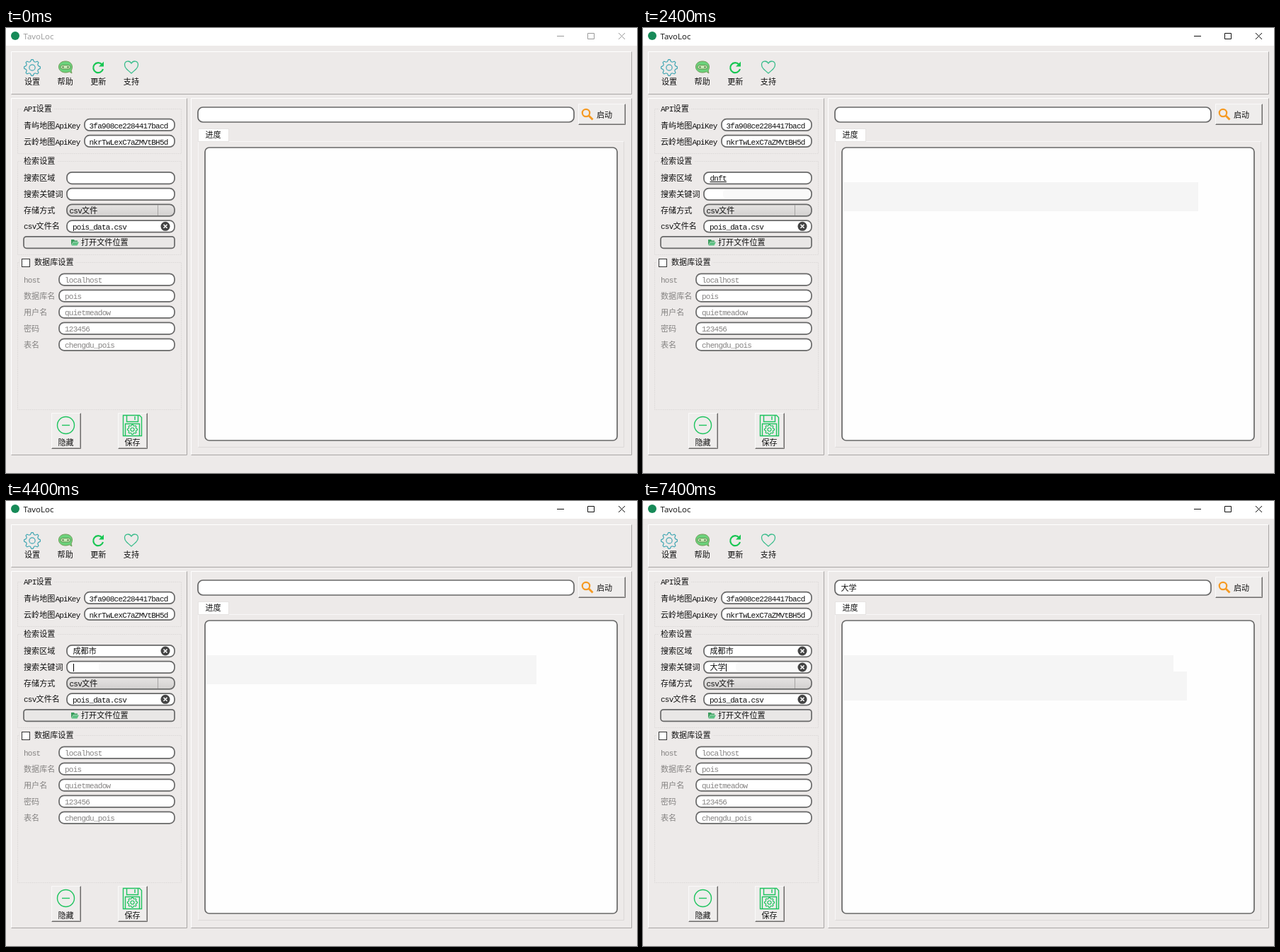
An HTML page that plays this animation: 891x629 px, repeating every 8 s.

```html
<!DOCTYPE html>
<html lang="zh">
<head>
<meta charset="utf-8">
<style>
html, body { margin: 0; width: 100%; height: 100%; overflow: hidden; background: #edeae9; }
svg { display: block; width: 891px; height: 629px; }
text { white-space: pre; }
.cjk { font: 11.1px "Noto Sans CJK SC", "Noto Sans CJK", sans-serif; }
.lat { font: 11px "Liberation Mono", monospace; letter-spacing: -.75px; }
.title { font: 11.5px "Open Sans", "Noto Sans", sans-serif; }
.cand { font: 17.2px "Open Sans", "Noto Sans CJK SC", "Noto Sans CJK", sans-serif; }
</style>
</head>
<body>
<svg id="stage" viewBox="0 0 891 629">
  <defs>
    <linearGradient id="shade" x1="0" y1="0" x2="0" y2="1">
      <stop offset="0" stop-color="#e6e4e3"/><stop offset="1" stop-color="#d2d0cf"/>
    </linearGradient>
    <clipPath id="keys"><rect x="118" y="125" width="113" height="50"/></clipPath>
  </defs>
  <g id="base"></g>
  <g id="live"></g>
</svg>
<script>
const LOOP = 8000, HAN = 11.1, LATIN = 5.85, FACE = '#edeae9';
const isHan = c => c > '\u2e80';
const textWidth = s => [...s].reduce((w, c) => w + (isHan(c) ? HAN : LATIN), 0);

// Full-width and half-width runs use separate fonts on one fixed grid.
function label(x, y, s, fill = '#111') {
  let out = '';
  for (const run of s.match(/[\u2e80-\uffff]+|[^\u2e80-\uffff]+/g) || []) {
    out += `<text class="${isHan(run[0]) ? 'cjk' : 'lat'}" x="${x}" y="${y}" fill="${fill}">${run}</text>`;
    x += textWidth(run);
  }
  return out;
}
const rect = (x, y, w, h, fill, extra = '') =>
  `<rect x="${x}" y="${y}" width="${w}" height="${h}" fill="${fill}" ${extra}/>`;
const path = (d, stroke, w = 1, fill = 'none') =>
  `<path d="${d}" stroke="${stroke}" stroke-width="${w}" fill="${fill}"/>`;
const circle = (x, y, r, fill, stroke = 'none', w = 1) =>
  `<circle cx="${x}" cy="${y}" r="${r}" fill="${fill}" stroke="${stroke}" stroke-width="${w}"/>`;
const field = (x, y, w, h, r = 7, fill = '#fff') =>
  rect(x + 1, y + 1, w - 2, h - 2, fill, `rx="${r}" stroke="#686868" stroke-width="1.7"`);

function bevel(x, y, w, h, light = '#fff', dark = '#a9a6a5') {
  const l = x + .5, t = y + .5, r = x + w - .5, b = y + h - .5;
  return path(`M${l} ${b}V${t}H${r}`, light) + path(`M${l} ${b}H${r}V${t}`, dark);
}
const button = (x, y, w, h) =>
  rect(x, y, w, h, '#efedec') + bevel(x, y, w, h, '#faf9f9', '#6f6d6c') +
  path(`M${x + 1} ${y + h - 1.5}H${x + w - 1.5}V${y + 1}`, '#aaa8a7');

function group(y, h, title, x = 25) {
  return rect(16.5, y + .5, 231, h, 'none', 'stroke="#dedbda" stroke-dasharray="2 1"') +
    rect(x - 3, y - 5, textWidth(title) + 6, 11, FACE) + label(x, y + 4, title);
}
function gear(cx, cy, r, depth, color, w) {
  let d = '';
  for (let i = 0; i < 32; i++) {
    const a = (i - 1.5) * Math.PI / 16, q = i % 4 === 1 || i % 4 === 2 ? r : r - depth;
    d += `${i ? 'L' : 'M'}${(cx + q * Math.cos(a)).toFixed(1)} ${(cy + q * Math.sin(a)).toFixed(1)}`;
  }
  return path(d + 'Z', color, w) + circle(cx, cy, r * .36, 'none', color, w);
}
const clearIcon = y => circle(225, y, 6.5, '#444') +
  path(`M222.5 ${y - 2.5}l5 5m0 -5l-5 5`, '#fff', 1.6);

function drawBase() {
  const green = '#1fc45f', gray = '#858382';
  let s = rect(0, 0, 891, 629, FACE) + rect(0, 0, 891, 25, '#fff') + circle(13, 11, 6, '#178a58');

  s += bevel(7, 33, 877, 61) + bevel(7, 99, 249, 505) + bevel(261, 99, 623, 505);

  s += gear(37, 56, 11.5, 2.6, '#43a7b3', 1.2);
  s += path('M84 47c-6 0-9.5 3.5-9.5 8s4 8 9.5 8c2 0 4-.4 5.5-1.2l3.5 2.2-1-4c1-1.3 1.5-3 1.5-5 0-4.5-3.5-8-9.5-8Z', '#739a58', 1, '#6bd27b');
  s += rect(77, 52.5, 14, 5.5, '#c6ebb5', 'rx="2.7" stroke="#5f9150"') +
    circle(80.5, 55.2, 1.2, '#5a8050') + circle(87.5, 55.2, 1.2, '#5a8050');
  s += path('M135.5 51.5A7 7 0 1 0 137 58', '#18c653', 2.2) +
    path('M138 47.5V54.5H131Z', 'none', 0, '#18c653');
  s += path('M177 64C171 59 167.5 56 167.5 52C167.5 46 174.5 45.5 177 50C179.5 45.5 186.5 46 186.5 52C186.5 56 183 59 177 64Z', '#3bbd8c', 1.3);
  ['设置', '帮助', '更新', '支持'].forEach((name, i) => s += label(26 + i * 46.6, 80, name));

  s += group(114, 63, 'API设置') + group(188, 132, '检索设置') + group(331, 208, '数据库设置', 40);
  s += rect(19, 325, 18, 13, FACE) + rect(22.5, 326.5, 11, 11, '#fff', 'stroke="#333"');

  s += label(25, 141.5, '青屿地图ApiKey') + label(25, 164.5, '云岭地图ApiKey');
  s += field(110, 127.7, 129, 18.5) + field(110, 150.7, 129, 18.5);
  s += `<g clip-path="url(#keys)">${label(117.5, 141.5, '3fa908ce2284417bacd')}${label(117.5, 164.5, 'nkrTwLexC7aZMVtBH5d')}</g>`;

  ['搜索区域', '搜索关键词', '存储方式', 'csv文件名'].forEach((name, i) => {
    const y = 202.8 + i * 22.8;
    s += label(25, y + 13.2, name) + field(85, y, 154, 18.5, 7, i === 2 ? 'url(#shade)' : '#fff');
  });
  s += path('M214.5 250V265', '#a5a3a2') + label(89.5, 261.5, 'csv文件');
  s += label(94, 284.5, 'pois_data.csv') + clearIcon(280.3);
  s += field(24, 293.8, 215, 18.5, 4, '#e9e7e6') + label(106, 307, '打开文件位置');
  s += path('M92 307V299H96L97 300.5H101V302H95Z', 'none', 0, '#3a9d5d') +
    path('M92.5 307.5L95 302.5H103L100.5 307.5Z', 'none', 0, '#5fc184');

  [['host', 'localhost'], ['数据库名', 'pois'], ['用户名', 'quietmeadow'], ['密码', '123456'], ['表名', 'chengdu_pois']]
    .forEach(([name, value], i) => {
      const y = 346.3 + i * 23;
      s += label(25, y + 13.5, name, gray) + field(74, y, 165, 18.5) + label(83, y + 13.5, value, gray);
    });

  s += button(64, 544, 42, 51) + button(158, 544, 42, 51);
  s += circle(84.5, 561.5, 12, 'none', green, 1.4) + path('M79 561.5H90', green, 1.4);
  s += path('M165.5 547.5H188.5L191.5 550.5V576.5H165.5ZM170.5 547.5V556.5H186.5V547.5M182 549V554M168.5 576V559.5H188.5V576', green, 1.4);
  s += gear(178.5, 567.5, 7, 1.6, green, 1.2);
  s += label(73.5, 590, '隐藏') + label(167.5, 590, '保存');

  s += field(270, 111, 533, 23, 7) + button(808, 107, 67, 30) + label(834, 126.5, '启动');
  s += circle(819, 120, 5.2, 'none', '#f59a23', 2.2) + path('M823 124L828.5 129.5', '#f59a23', 2.8);
  s += bevel(271, 160, 602, 433, '#f8f7f7', '#dcd9d8');
  s += rect(271.5, 142.5, 43, 18, '#fff', 'stroke="#e6e3e2"') + label(281.5, 155, '进度');
  s += field(280, 168, 584, 416, 6, '#fefefe');
  return s;
}

// Candidate windows: left, top, page divider, words, and number positions where not evenly flowed.
const menus = {
  d: [103, 218, 668, '大 在d 有e 三dg 石头gu 原来go 成为yl'],
  dn: [103, 218, 651, '成 万v 成为yl 成功al 成了bn 万元fq 戊y', [114, 171, 237, 323, 411, 506, 596]],
  dnf: [103, 218, 684, '万元 成都t 成者tj 成套dd 成地bn 成才ft 成真fh'],
  dnft: [103, 218, 678, '成都 成都市ym 成者j 成规fw 成教bt 成熟yb'],
  ym: [125, 218, 703, '高 市场fn 调味kf 设计yf 敲kc 调查sj 调整gk', [136, 193, 283, 371, 460, 535, 621]],
  ymhj: [125, 218, 643, '市 市里jf 市内mw 市民na 市区aq 市容pw'],
  d2: [103, 241, 668, '大 在d 有e 三dg 石头gu 原来go 成为yl'],
  dd: [103, 241, 703, '大 大家pe 大哥sk 大学ip 大陆bf 大的rq 大量jg', [114, 171, 265, 355, 444, 535, 625]],
  ddi: [103, 241, 690, '大 大学p 大小h 大海tx 大湾yo 大河sk 大洋ud'],
  ddip: [103, 241, 662, '大学 大学生tg 大觉mq 大举wf 大兴wu 大堂kf']
};

function flow(x, end, words) {
  const widths = words.map(w => [...w].reduce((n, c) => n + (isHan(c) ? 17 : 9.5), 40));
  const k = (end - x) / widths.reduce((a, b) => a + b);
  let at = x + 11;
  return widths.map(w => (at += w * k) - w * k);
}

function menu(key) {
  const [x, y, end, list, given] = menus[key];
  const words = list.split(' '), xs = given || flow(x, end, words);
  let s = rect(x + .5, y + .5, end + 105 - x, 40, '#f3f3f3', 'stroke="#dadada"') +
    rect(x, y, xs[1] - 11 - x, 41, '#a5d6ff');
  words.forEach((w, i) => {
    s += `<text class="cand" x="${xs[i]}" y="${y + 27}" fill="#666">${i + 1}</text>` +
      `<text class="cand" x="${xs[i] + 17.5}" y="${y + 27}" fill="#111">${w}</text>`;
  });
  const m = y + 21;
  s += path(`M${end + .5} ${y}v41m60 -41v41`, '#dadada');
  s += path(`M${end + 16.5} ${m - 5}l-5 5 5 5`, '#aaa', 1.2) + path(`M${end + 44} ${m - 5}l5 5 -5 5`, '#222', 1.3);
  s += circle(end + 83, m, 7, 'none', '#222', 1.2) + circle(end + 80.5, m - 2, 1, '#222') +
    circle(end + 85.5, m - 2, 1, '#222') + path(`M${end + 79} ${m + 2}q4 4 8 0`, '#222', 1.2);
  return s;
}

// Each step changes only the listed values.
const steps = [
  [0, { active: 0, row: 0, caret: 0, area: '', word: '', typed: '', menu: '', clear: 0, trail: 0, trail2: 0, edge: 113 }],
  [500, { active: 1, caret: 1 }],
  [1000, { caret: 0 }],
  [1400, { caret: 1, typed: 'd', menu: 'd' }],
  [1800, { typed: 'dn', menu: 'dn' }],
  [2000, { typed: 'dnf', menu: 'dnf' }],
  [2100, { typed: 'dnft', menu: 'dnft' }],
  [2400, { caret: 0, menu: '', trail: 784 }],
  [2500, { caret: 1, typed: '', area: '成都' }],
  [2600, { clear: 1 }],
  [2900, { caret: 0, typed: 'ym', menu: 'ym' }],
  [3000, { typed: 'ymhj', menu: 'ymhj', trail: 749, edge: 131 }],
  [3400, { menu: '' }],
  [3500, { caret: 1, typed: '', area: '成都市' }],
  [3900, { caret: 0 }],
  [4400, { caret: 1, row: 1 }],
  [5000, { caret: 0 }],
  [5400, { caret: 1 }],
  [5600, { typed: 'd', menu: 'd2' }],
  [5700, { typed: 'dd', menu: 'dd' }],
  [5800, { typed: 'ddi', menu: 'ddi' }],
  [5900, { typed: 'ddip', menu: 'ddip' }],
  [6000, { caret: 0, menu: '', trail2: 768 }],
  [6100, { typed: '', word: '大学' }],
  [6400, { caret: 1 }],
  [6900, { caret: 0 }],
  [7400, { caret: 1 }]
];

function drawLive(v) {
  const ink = v.active ? '#111' : '#999';
  let s = `<text class="title" x="24.5" y="15.5" fill="${ink}">TavoLoc</text>` +
    path('M778 11.5H788M821.5 7.5h9v8h-9ZM865 7l9 9m0 -9l-9 9', ink);
  if (v.trail) {
    s += rect(282, 218, v.trail - 282, 41, '#f5f5f5') + rect(v.edge, 228, 236 - v.edge, 13, '#f9f9f9', 'rx="5"');
  }
  if (v.trail2) s += rect(282, 241, v.trail2 - 282, 41, '#f5f5f5');

  [v.area, v.word].forEach((done, i) => {
    const typed = v.row === i ? v.typed : '', y = 216 + i * 23;
    const start = 94.5 + textWidth(done), end = start + textWidth(typed);
    s += label(94.5, y, done + typed);
    if (typed) s += path(`M${start} ${y + 1.5}H${end}`, '#111');
    if (v.caret && v.row === i) s += rect(Math.round(end), y - 9, 1, 11, '#000');
  });
  if (v.clear) s += clearIcon(212);
  if (v.word) s += clearIcon(235) + label(279.5, 126.5, v.word);
  if (v.menu) s += menu(v.menu);
  return s;
}

document.getElementById('base').innerHTML = drawBase();
const live = document.getElementById('live'), begin = performance.now();
let shown = -1;
function tick() {
  const t = (performance.now() - begin) % LOOP;
  const past = steps.filter(([at]) => at <= t);
  if (past.length !== shown) {
    shown = past.length;
    live.innerHTML = drawLive(Object.assign({}, ...past.map(p => p[1])));
  }
  requestAnimationFrame(tick);
}
tick();
</script>
</body>
</html>
```
